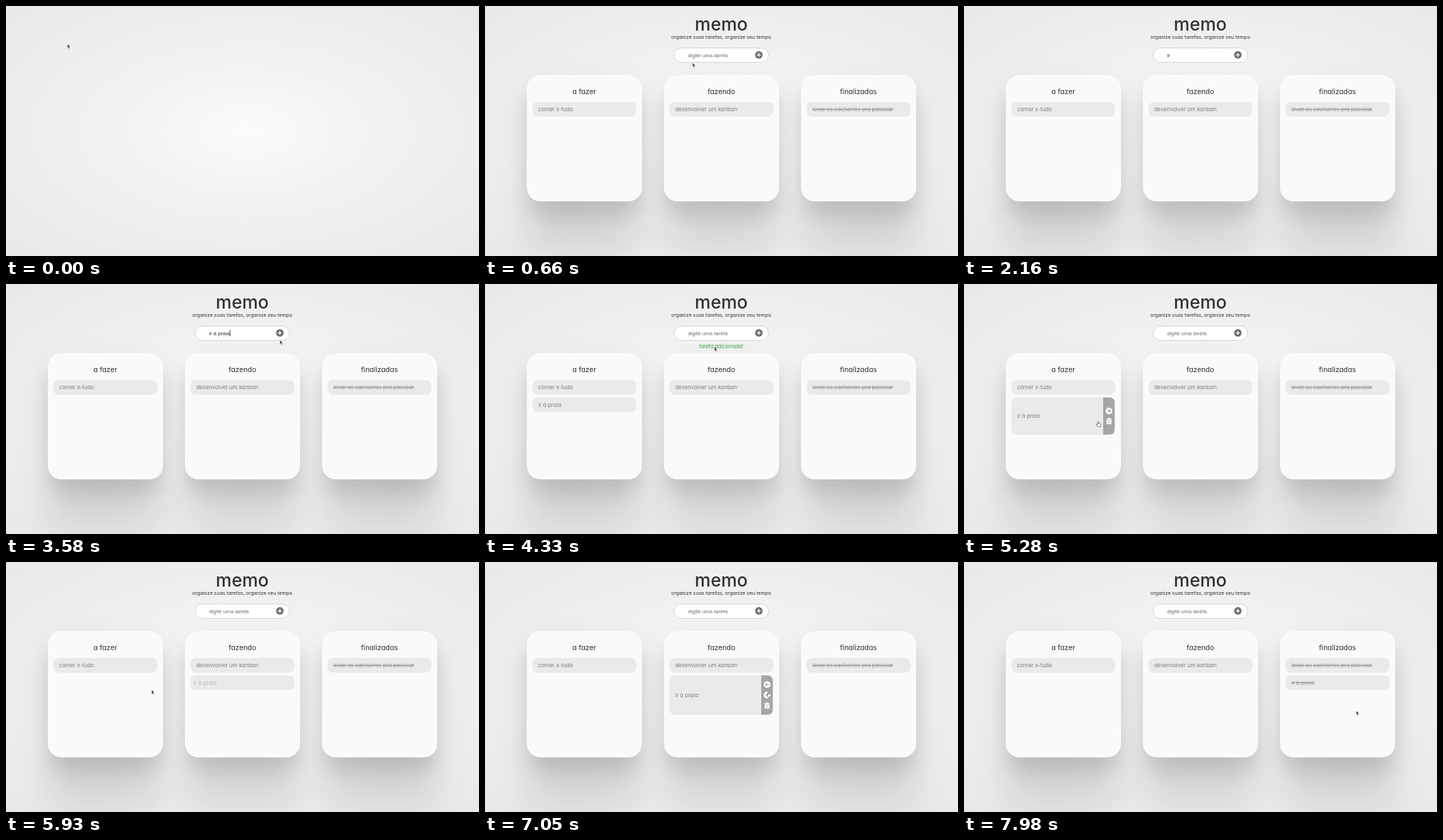
Write an HTML page that moves like this. It is 690x366 px and loops after 8000 ms.

```html
<!DOCTYPE html>
<html lang="pt-BR">
<head>
<meta charset="utf-8">
<title>memo</title>
<style>
  html, body { margin: 0; width: 100%; height: 100%; overflow: hidden; background: #eee; }
  svg { display: block; width: 100%; height: 100%; }
  text {
    font-family: Inter, "Open Sans", sans-serif;
    font-feature-settings: "cv11";
    font-optical-sizing: none;
    fill: #303030;
  }
  .mid { text-anchor: middle; }
  .logo { font-size: 26px; font-weight: 500; }
  .head { font-size: 10.4px; }
  .task { font-size: 8.1px; font-weight: 300; fill: #606060; }
  .done { fill: #808080; text-decoration: line-through; }
  .field { font-family: "Liberation Sans", Arial, sans-serif; font-size: 7.75px; }
</style>
</head>
<body>
<svg viewBox="0 0 690 366" preserveAspectRatio="none">
  <defs>
    <radialGradient id="wall" cx=".51" cy=".5" r=".72">
      <stop offset="0" stop-color="#fbfbfb"/>
      <stop offset=".35" stop-color="#f3f3f3"/>
      <stop offset="1" stop-color="#e8e8e8"/>
    </radialGradient>
    <filter id="near" x="-50%" y="-50%" width="200%" height="200%">
      <feGaussianBlur stdDeviation="13"/>
    </filter>
    <filter id="far" x="-60%" y="-60%" width="220%" height="220%">
      <feGaussianBlur stdDeviation="27"/>
    </filter>
  </defs>
  <rect width="690" height="366" fill="url(#wall)"/>
  <g id="page">
    <g id="board"></g>
    <g id="live"></g>
  </g>
  <g id="pointer"></g>
</svg>
<script>
const LOOP = 8000;
const COLS = [61, 261, 461];
const TITLES = ['a fazer', 'fazendo', 'finalizadas'];
const TOP = 140.5, ROW = 21.5, GAP = 4;
const TASK = 'ir à praia';

// moments of the story
const FOCUS = 860, ADD = 3780, START = 5780, FINISH = 7460;

const $ = id => document.getElementById(id);
const clamp = v => Math.max(0, Math.min(1, v));
const ramp = (t, from, to) => clamp((t - from) / (to - from));
const smooth = p => p * p * (3 - 2 * p);
const ease = (t, from, to) => smooth(ramp(t, from, to));
const pulse = (t, on, off, d = 180) => ease(t, on, on + d) - ease(t, off, off + d);

// pointer path: time, x, y
const PATH = [
  [50, 89.5, 55.5], [350, 190, 76], [660, 302.5, 83], [810, 309, 76], [860, 316.5, 75.5],
  [3180, 316.5, 75.5], [3580, 399.5, 82], [3730, 400, 71], [4030, 400, 70],
  [4130, 394, 58], [4380, 320, 100], [4630, 232, 143], [4730, 200, 164], [4880, 180, 189],
  [5080, 185, 203], [5380, 201, 200], [5680, 212, 187], [5930, 212, 187],
  [6130, 250, 196], [6300, 250, 196], [6500, 282, 184], [6800, 388, 190], [7050, 413.5, 190],
  [7410, 413.5, 190], [7610, 540, 216], [7710, 579, 218], [7760, 572, 217.5]
];

function pointerAt(t) {
  let i = PATH.findIndex(k => k[0] > t);
  if (i < 0) return PATH[PATH.length - 1].slice(1);
  if (i === 0) return PATH[0].slice(1);
  const [t0, x0, y0] = PATH[i - 1], [t1, x1, y1] = PATH[i];
  const p = ramp(t, t0, t1);
  return [x0 + (x1 - x0) * p, y0 + (y1 - y0) * p];
}

const SHAPES = {
  arrow: '<path d="M.3.3V5.9L1.5 4.9 2.4 7.2 3.5 6.7 2.5 4.5H4.2Z" fill="#2c2c2c" stroke="#eee" stroke-width=".4"/>',
  beam: '<path d="M-1.3-3.5Q0-3.5 0-2.5V2.5Q0 3.5-1.3 3.5M1.3-3.5Q0-3.5 0-2.5M0 2.5Q0 3.5 1.3 3.5" fill="none" stroke="#444" stroke-width=".7"/>',
  hand: '<path d="M-.8 5V.7Q0-.5.8.7V3L3.4 3.6Q4.2 4 4 5.2L3.3 8H-.4L-2.8 4.9Q-2.6 3.7-1.5 4.4Z" fill="#fff" stroke="#444" stroke-width=".7"/>'
};

function shapeAt(t) {
  if (t >= FOCUS && t < 3280) return t >= 2160 && t < 3180 ? '' : 'beam';
  const overButton = t >= 3680 && t < 4100;
  const overTask = t >= 4680 && t < START || t >= 6450 && t < FINISH;
  return overButton || overTask ? 'hand' : 'arrow';
}

function arrowIcon(x, y, dir) {
  return `<g transform="translate(${x} ${y}) scale(${dir} 1)">
    <circle r="4.9" fill="#fff"/>
    <path d="M-2.4 0H2M.2-1.9 2.2 0 .2 1.9" fill="none" stroke="#999" stroke-width="1.1"/></g>`;
}

function trashIcon(x, y) {
  return `<g transform="translate(${x} ${y})">
    <path d="M-4.2-3.4H-1.5L-1-4.6H1L1.5-3.4H4.2V-2.1H-4.2ZM-3.6-1.5H3.6V4.5H-3.6Z" fill="#fff"/>
    <path d="M-1.1.4 1.1 2.6M1.1.4-1.1 2.6" stroke="#999" stroke-width=".8"/></g>`;
}

function sideBar(x, y, h, both, open) {
  const cx = x + 142.5, cy = y + h / 2, left = x + 134, right = x + 150.8;
  const icons = both
    ? arrowIcon(cx, cy - 15.3, -1) + arrowIcon(cx, cy, 1) + trashIcon(cx, cy + 15.3)
    : arrowIcon(cx, cy - 7.4, 1) + trashIcon(cx, cy + 7.4);
  return `<g opacity="${open}">
    <path d="M${left} ${y}H${right - 8}Q${right} ${y} ${right} ${y + 8}V${y + h - 8}Q${right} ${y + h} ${right - 8} ${y + h}H${left}Z" fill="#a5a5a5"/>
    ${icons}</g>`;
}

function task(col, y, label, { open = 0, enter = 1 } = {}) {
  const x = COLS[col] + 8, both = col === 1;
  const h = ROW + open * (both ? 36 : 33);
  const bar = open > 0 ? sideBar(x, y, h, both, open) : '';
  const cls = col === 2 ? 'task done' : 'task';
  const width = 151.7 - open;
  return `<rect x="${x}" y="${y}" width="${width}" height="${h}" rx="8" fill="#eaeaea" opacity="${clamp(enter * 2.5)}"/>
    ${bar}<text class="${cls}" x="${x + 8.5 - 7 * (1 - enter)}" y="${y + h / 2 + 2.8}" opacity="${enter}">${label}</text>`;
}

// typing: time and what the field holds from then on
const TYPED = [[1510, 'i'], [1590, 'ir'], [1670, 'ir '], [2320, 'ir `']];
for (let i = 0; i < 7; i++) TYPED.push([2480 + i * 70, TASK.slice(0, 4 + i)]);

const pen = document.createElement('canvas').getContext('2d');
pen.font = '7.75px "Liberation Sans", Arial, sans-serif';

function field(t) {
  let value = '';
  if (t < ADD) for (const [at, s] of TYPED) if (t >= at) value = s;
  const caret = t >= FOCUS && t < ADD && !(t >= 1240 && t < 1510) && !(t >= 2000 && t < 2320);
  const cx = 296.4 + pen.measureText(value).width;
  return `<text class="field" x="296.3" y="74.6" xml:space="preserve" style="fill:${value ? '#2a2a2a' : '#6c6c6c'}">${value || 'digite uma tarefa'}</text>`
    + (caret ? `<rect x="${cx}" y="67" width=".8" height="9.5" fill="#222"/>` : '');
}

function shadow(x, y, h, kind, opacity) {
  return `<rect x="${x + 2}" y="${y}" width="164" height="${h}" rx="20" opacity="${opacity}" filter="url(#${kind})"/>`;
}

function board() {
  const shadows = COLS.map(x => shadow(x, 125, 232, 'far', .11) + shadow(x, 125, 182, 'near', .11)).join('');
  const cards = COLS.map((x, i) => `
    <rect x="${x}" y="101" width="168" height="185" rx="20" fill="#fafafa"/>
    <text class="mid head" x="${x + 83.8}" y="128.6">${TITLES[i]}</text>`).join('');
  return `${shadows}${cards}
    <text class="mid logo" x="344.7" y="36">memo</text>
    <text class="mid" x="344.7" y="47.9" font-size="7.2">organize suas tarefas, organize seu tempo</text>
    <rect x="276" y="61.5" width="137.5" height="21" rx="10.5" fill="#fff" stroke="#aaa" stroke-width=".8" stroke-dasharray="1.4 1"/>
    <circle cx="399.5" cy="71.6" r="5.5" fill="#6c6c6c"/>
    <path d="M396.5 71.6H402.5M399.5 68.6V74.6" stroke="#fff" stroke-width="1.4"/>`;
}

function tasks(t) {
  const second = TOP + ROW + GAP;
  const first = pulse(t, 4660, 5080);
  let out = task(0, TOP, 'comer x-tudo', { open: first })
    + task(1, TOP, 'desenvolver um kanban')
    + task(2, TOP, 'levar os cachorros pra passear');
  if (t >= FINISH) {
    out += task(2, second, TASK, { enter: ramp(t, FINISH, FINISH + 300) });
  } else if (t >= START) {
    out += task(1, second, TASK, { open: ease(t, 6450, 6630), enter: ramp(t, START, START + 350) });
  } else if (t >= ADD) {
    out += task(0, second + first * 33, TASK, { open: ease(t, 5080, 5260), enter: ramp(t, ADD, ADD + 250) });
  }
  return out;
}

function toast(t) {
  const show = pulse(t, ADD, 5080, 150);
  return show > 0
    ? `<text class="mid" x="344.7" y="93.9" font-size="7.4" style="fill:#3f9f45" opacity="${show}">tarefa adicionada!</text>`
    : '';
}

function render(t) {
  $('page').setAttribute('opacity', ease(t, 49, 400));
  $('live').innerHTML = field(t) + toast(t) + tasks(t);
  const [x, y] = pointerAt(t);
  $('pointer').setAttribute('transform', `translate(${x} ${y})`);
  $('pointer').innerHTML = SHAPES[shapeAt(t)] || '';
}

$('board').innerHTML = board();
const begin = performance.now();
function tick() {
  render((performance.now() - begin) % LOOP);
  requestAnimationFrame(tick);
}
tick();
</script>
</body>
</html>
```
